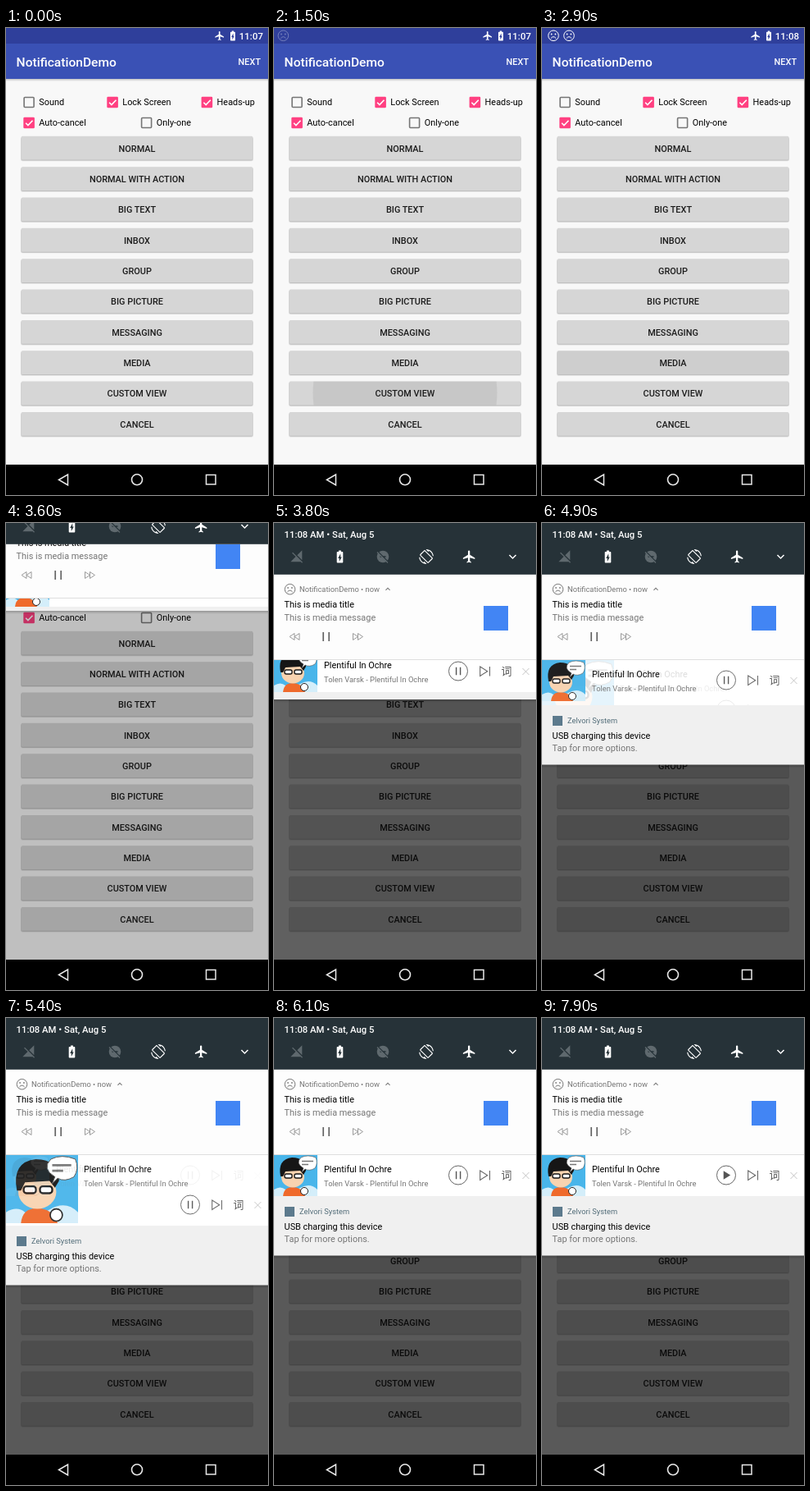
These frames come from a looping animation (320 px wide and 569 px high, 8 s). An HTML page:

```html
<!DOCTYPE html>
<html lang="en">
<head>
<meta charset="utf-8">
<title>Notification demo</title>
<style>
html, body { margin: 0; width: 100%; height: 100%; overflow: hidden; background: #000; }
#stage { display: block; width: 100vw; height: 100vh; }
text { font-family: Roboto, "Noto Sans CJK SC", "Noto Sans CJK JP", sans-serif; white-space: pre; }
.line { fill: none; stroke: currentColor; }
</style>
</head>
<body>
<svg id="stage" viewBox="0 0 320 569"></svg>
<script>
const STEP = 100, LOOP = 8000;
const SONG = 'Plentiful In Ochre', ARTIST = 'Tolen Varsk';
const BUTTONS = ['NORMAL', 'NORMAL WITH ACTION', 'BIG TEXT', 'INBOX', 'GROUP',
  'BIG PICTURE', 'MESSAGING', 'MEDIA', 'CUSTOM VIEW', 'CANCEL'];
const buttonY = i => 131.8 + i * 37.35;

// Icon outlines on a 24 unit grid
const ICONS = {
  plane: 'M21 16v-2l-8-5V3.5a1.5 1.5 0 0 0-3 0V9l-8 5v2l8-2.5V19l-2 1.5V22l3.5-1 3.5 1v-1.5L13 19v-5.5l8 2.5z',
  battery: 'M15.7 4H14V2h-4v2H8.3C7.6 4 7 4.6 7 5.3v15.4c0 .7.6 1.3 1.3 1.3h7.4c.7 0 1.3-.6 1.3-1.3V5.3C17 4.6 16.4 4 15.7 4zM11 20v-5.5H9L13 7v5.5h2L11 20z',
  noSignal: 'M21 1l-8.6 8.6 8.6 8.6V1zM4.8 4.5L3.5 5.8l6.4 6.3L1 21h17.7l2 2 1.3-1.3L4.8 4.5z',
  rotate: 'M16.5 2.5c3.3 1.6 5.6 4.7 6 8.5H24C23.4 4.8 18.3 0 12 0l-.7 0 3.8 3.8 1.4-1.3zm-6.3-.8c-.6-.6-1.5-.6-2.1 0L1.8 8.1c-.6.6-.6 1.5 0 2.1l12 12c.6.6 1.5.6 2.1 0l6.4-6.3c.6-.6.6-1.5 0-2.1L10.2 1.7zm4.6 19.5L2.8 9.2l6.4-6.4 12 12-6.4 6.4zm-7.3.3C4.3 19.9 1.9 16.8 1.6 13H.1C.6 19.2 5.7 24 12 24l.7 0-3.8-3.8-1.4 1.3z',
  more: 'M16.6 8.6L12 13.2 7.4 8.6 6 10l6 6 6-6z',
  less: 'M7.4 15.4L12 10.8l4.6 4.6L18 14l-6-6-6 6z'
};

// Text is placed by the middle of its capitals
const text = (x, y, size, str, fill = '#000', extra = '') =>
  `<text x="${x}" y="${y + size * .355}" font-size="${size}" fill="${fill}" ${extra}>${str}</text>`;
const rect = (x, y, w, h, fill, extra = '') =>
  `<rect x="${x}" y="${y}" width="${w}" height="${h}" fill="${fill}" ${extra}/>`;
const icon = (name, x, y, scale, fill = '#fff') =>
  `<path d="${ICONS[name]}" fill="${fill}" transform="translate(${x} ${y}) scale(${scale}) translate(-12 -12)"/>`;
const line = (d, color, width = 1) =>
  `<path d="${d}" class="line" color="${color}" stroke-width="${width}"/>`;
const face = (color, id = '') => `<g ${id} color="${color}"><circle r="6.3" class="line"/>
  <path d="M-3.2 3.4Q0 -.6 3.2 3.4" class="line"/>
  <circle cx="-2.4" cy="-1.8" r=".9" fill="${color}"/><circle cx="2.4" cy="-1.8" r=".9" fill="${color}"/></g>`;
const at = (x, y, body) => `<g transform="translate(${x} ${y})">${body}</g>`;
const MEDIUM = 'font-weight="500"';

const checkbox = (x, y, label, on) => (on
  ? rect(x, y - 6.8, 13.6, 13.6, '#ff4081', 'rx="1.4"') + line(`M${x + 2.8} ${y + .2}l2.8 2.8 5.6-5.8`, '#fff', 1.6)
  : rect(x + .8, y - 6, 12, 12, 'none', 'rx="1" stroke="#757575" stroke-width="1.6"'))
  + text(x + 19, y, 10.9, label);

const button = (label, i) => {
  const y = buttonY(i);
  return rect(18, y + 1.2, 284, 29.3, '#000', 'rx="2" opacity=".1"')
    + rect(18.5, y + .6, 283, 29.2, '#000', 'rx="2" opacity=".14"')
    + rect(18.5, y, 283, 28.8, '#d6d6d6', 'rx="1.6"')
    + `<svg x="18.5" y="${y}" width="283" height="28.8"><circle id="ripple${i}" cx="141.5" cy="14" r="0"/></svg>`
    + text(160, y + 14.9, 10.9, label, '#1c1c1c', MEDIUM + ' text-anchor="middle"');
};

const app = rect(0, 0, 320, 532, '#f8f8f8')
  + rect(0, 62, 320, 3, 'url(#fade)')
  + rect(0, 0, 320, 19, '#2f3f9b') + rect(0, 19, 320, 43, '#3a51b5')
  + face('#fff', 'id="face1"') + face('#fff', 'id="face2"')
  + icon('plane', 261, 9.5, .56) + icon('battery', 277, 9.5, .6)
  + text(314, 9.8, 11.5, '<tspan id="clock"></tspan>', '#fff', MEDIUM + ' text-anchor="end"')
  + text(12.6, 41, 15.56, 'NotificationDemo', '#fff', MEDIUM)
  + text(311, 41, 10.9, 'NEXT', '#fff', MEDIUM + ' text-anchor="end"')
  + checkbox(21.3, 90.5, 'Sound') + checkbox(123.3, 90.5, 'Lock Screen', true)
  + checkbox(238.6, 90.5, 'Heads-up', true) + checkbox(21.3, 115.5, 'Auto-cancel', true)
  + checkbox(164.8, 115.5, 'Only-one') + BUTTONS.map(button).join('');

const media = rect(0, 0, 320, 105, '#fdfdfd') + rect(0, 104, 320, 1, '#dedede')
  + at(19.5, 18.7, face('#757575'))
  + text(31, 18.7, 9.33, 'NotificationDemo • now', '#757575') + icon('less', 139, 18.5, .48, '#757575')
  + text(12.6, 37.5, 10.9, 'This is media title') + text(12.6, 53, 10.9, 'This is media message', '#757575')
  + line('M25 72.5v8l-6-4zM31 72.5v8l-6-4zM96.5 72.5v8l6-4zM102.5 72.5v8l6-4z', '#9a9a9a')
  + line('M60.2 71v11M67.2 71v11', '#666', 1.7)
  + rect(256, 39, 30, 30, '#4285f4');

const avatar = (w, h) => `<svg width="${w}" height="${h}" viewBox="0 0 53 50" preserveAspectRatio="none">
  ${rect(0, 0, 53, 50, '#48b5ea')}
  <path d="M0 42q8-5 14 0t18-2 21 2v8H0z" fill="#d4eefa"/>
  <path d="M11 50q1-11 12-11t15 11z" fill="#ef6a2c"/>
  <ellipse cx="23" cy="27" rx="14" ry="12.5" fill="#f8d3b0"/>
  <path d="M8 26Q4 5 22 3q17 0 17 16l-3 5-4-5-18 1-3 6z" fill="#161616"/>
  <g fill="#fff" stroke="#161616" stroke-width="1.4"><rect x="13" y="23" width="9" height="5" rx="2"/>
  <rect x="25" y="23" width="9" height="5" rx="2"/></g>
  <circle cx="37" cy="44" r="4.5" fill="#fff" stroke="#222"/>
  <path d="M34 21l2-5q-10-6-3-13 8-4 18 0 3 7-1 13-7 4-12 1z" fill="#fff" stroke="#555" stroke-width=".6"/>
  ${line('M34 7.5h14M34 11.5h8', '#777', 1.6)}</svg>`;

const controls = `<circle cx="225" cy="24.5" r="11.5" class="line" color="#666"/>
  <path class="state" fill="none" stroke="#555" stroke-width="1.4"/>`
  + line('M251.7 19v11.4l9-5.7zM263.5 19v11.4', '#666', 1.1)
  + text(284, 24.3, 13, '词', '#555', 'text-anchor="middle" font-weight="300"')
  + line('M303.5 21l8 8M311.5 21l-8 8', '#c4c4c4');

const song = x => text(x, 17, 10.9, SONG)
  + text(x, 34.7, 9.4, `${ARTIST} - ${SONG}`, '#757575');

const system = rect(0, 0, 320, 73, '#f0f0f0')
  + rect(13, 13, 12, 12, '#5c7a8d') + text(31, 18.7, 9.33, 'Zelvori System', '#546e7a')
  + text(12.6, 36.7, 10.9, 'USB charging this device') + text(12.6, 52.4, 10.9, 'Tap for more options.', '#757575');

const header = rect(0, 0, 320, 62.8, '#263238')
  + text(12.6, 13.9, 11.3, '11:08 AM • Sat, Aug 5', '#fff', MEDIUM)
  + icon('noSignal', 28, 41, .7, '#5f696e') + icon('battery', 80.5, 41, .76)
  + '<circle cx="133" cy="41" r="7.3" fill="#5f696e"/>'
  + line('M129.5 41h7M125.5 33.5l15 15', '#263238', 1.5) + line('M126 35.5l13 13', '#5f696e', 1.2)
  + icon('rotate', 186, 41, .74) + icon('plane', 238.5, 41, .76) + icon('more', 291.5, 41, .76);

const nav = rect(0, 532, 320, 37, '#000')
  + line('M64.5 550.5L75.5 544v13zM244.5 544.5h11.5v11.5h-11.5z', '#e8e8e8', 1.5)
  + '<circle cx="160" cy="550.3" r="6.5" class="line" color="#e8e8e8" stroke-width="1.6"/>';

document.getElementById('stage').innerHTML = `
  <defs><linearGradient id="fade" x2="0" y2="1"><stop stop-opacity=".22"/><stop offset="1" stop-opacity="0"/></linearGradient></defs>
  ${app}<rect id="scrim" width="320" height="532"/>
  <g id="shade">
    <rect id="shadow" width="320" height="4" fill="url(#fade)"/>
    <g id="media">${media}</g>
    <svg id="music" width="320">${rect(0, 0, 320, 90, '#fff')}<g id="musicBody">
      <g id="wide">${avatar(88, 83)}${song(95)}${at(0, 36, controls)}</g>
      <g id="compact">${avatar(53, 50)}${song(61)}${controls}</g></g></svg>
    <svg id="system" width="320"><g id="systemBody">${system}</g></svg>
    <g id="header">${header}</g>
  </g>${nav}`;

const el = id => document.getElementById(id);
const set = (id, attrs) => { for (const k in attrs) el(id).setAttribute(k, attrs[k]); };
const move = (id, x, y) => set(id, { transform: `translate(${x} ${y})` });

// Linear value through time, from pairs of time and value
function tween(t, keys) {
  if (t <= keys[0]) return keys[1];
  for (let i = 2; i < keys.length; i += 2)
    if (t <= keys[i]) {
      const p = (t - keys[i - 2]) / (keys[i] - keys[i - 2]);
      return keys[i - 1] + p * (keys[i + 1] - keys[i - 1]);
    }
  return keys[keys.length - 1];
}

function draw(t) {
  el('clock').textContent = t < 1600 ? '11:07' : '11:08';
  move('face1', tween(t, [1400, 10, 1700, 14]), 9.3);
  set('face1', { opacity: tween(t, [1400, 0, 1700, 1]) });
  move('face2', tween(t, [2700, 22, 2900, 33]), 9.3);
  set('face2', { opacity: tween(t, [2700, 0, 2900, 1]) });
  set('ripple8', { r: tween(t, [1200, 0, 1600, 150]), opacity: tween(t, [1600, .07, 2000, 0]) });
  set('ripple7', { r: tween(t, [2400, 0, 2600, 150]), opacity: t < 3600 ? .035 : 0 });

  const open = t >= 3600;
  set('shade', { visibility: open ? 'visible' : 'hidden' });
  set('scrim', { opacity: open ? tween(t, [3600, .23, 3700, .46, 3800, .61, 4000, .62, 4400, .64]) : 0 });
  if (!open) return;

  const mediaY = 62 + tween(t, [3600, -75, 3700, -30, 3800, 0]);
  const musicH = tween(t, [3600, 10, 3800, 39, 3900, 41, 4000, 41, 4400, 50, 4800, 50,
    4900, 55, 5300, 88, 5400, 86, 5600, 74, 5700, 74, 5800, 50]);
  const systemH = tween(t, [3600, 5, 3800, 9, 3900, 10, 4000, 10, 4100, 30, 4200, 54, 4300, 67, 4400, 72.5]);
  const musicY = mediaY + 105, systemY = musicY + musicH;
  const grown = Math.max(0, (musicH - 50) / 38);

  move('header', 0, tween(t, [3600, -37, 3700, -14, 3800, 0]));
  move('media', 0, mediaY);
  set('music', { y: musicY, height: musicH });
  move('musicBody', 0, Math.min(0, musicH - 50));
  set('compact', { opacity: 1 - grown ** 1.5 });
  set('wide', { opacity: grown });
  set('system', { y: systemY, height: systemH });
  move('systemBody', 0, systemH - 72.5);
  set('shadow', { y: systemY + systemH });

  const stopped = t >= 7300;
  for (const p of document.querySelectorAll('.state')) {
    p.setAttribute('d', stopped ? 'M222.4 20.6v7.8l6.4-3.9z' : 'M222.6 19.8v9.4M227.6 19.8v9.4');
    p.setAttribute('fill', stopped ? '#555' : 'none');
  }
}

const start = performance.now();
function tick() {
  draw(Math.floor((performance.now() - start) % LOOP / STEP) * STEP);
  requestAnimationFrame(tick);
}
tick();
</script>
</body>
</html>
```
